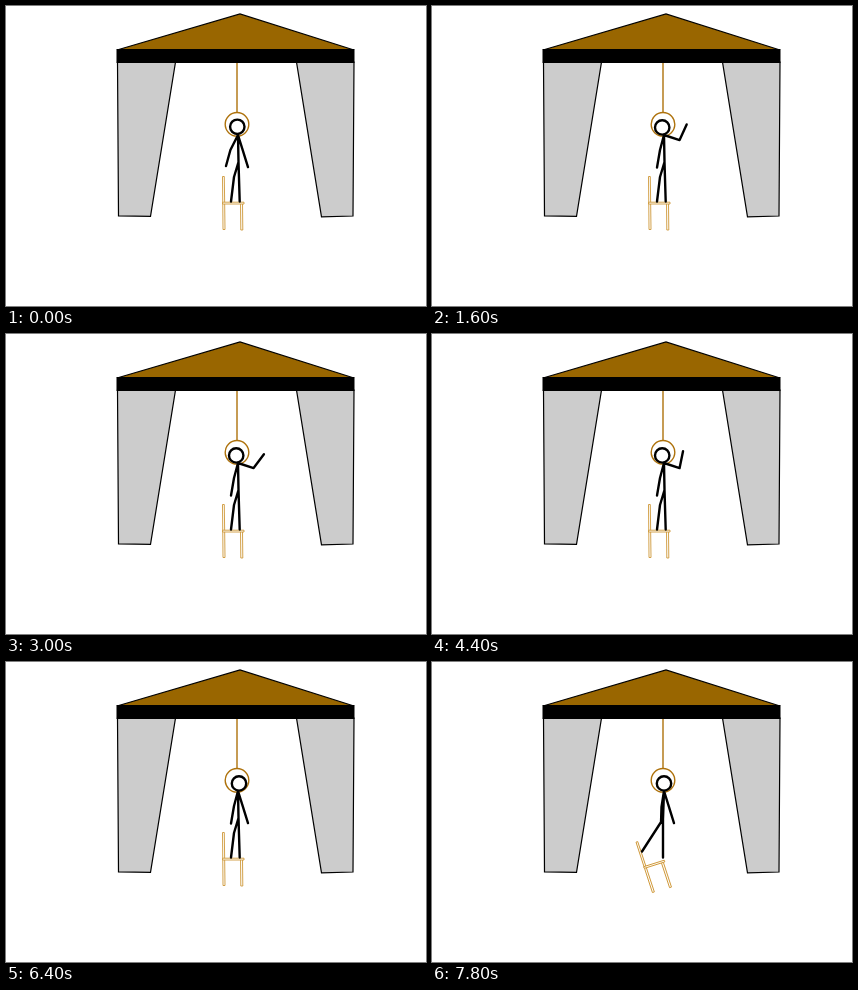
An HTML page for the animation above (8 s loop, 420 px wide and 300 px high).

```html
<!DOCTYPE html>
<html lang="en">
<head>
<meta charset="utf-8">
<title>Stick figure stage</title>
<style>
html, body { margin: 0; width: 100%; height: 100%; overflow: hidden; background: #fff; }
svg { display: block; width: 420px; height: 300px; }
.limb { fill: none; stroke: #000; stroke-width: 2.4; stroke-linecap: round; stroke-linejoin: round; }
.rope { fill: none; stroke: #ae720c; stroke-width: 1.4; }
.drape { fill: #ccc; stroke: #000; stroke-width: 1.2; }
</style>
</head>
<body>
<svg viewBox="0 0 420 300">
  <path d="M111 44L234 8L348 44Z" fill="#996600" stroke="#000" stroke-width="1.2"/>
  <path class="drape" d="M111.5 56H169.5L144.5 210.3L112.5 209.8Z"/>
  <path class="drape" d="M290.5 56H348L347 210L315.5 210.8Z"/>
  <rect x="110.5" y="43" width="238" height="14"/>
  <path class="rope" d="M231 57V106.5"/>
  <g id="chair" fill="#fff" stroke="#cf9838" stroke-width=".9">
    <path d="M-.5 0H1.3L2 53H0Z"/>
    <path d="M17.5 27H19.5L19.8 53.5H17.8Z"/>
    <path d="M-.5 25.7H21V27.5H-.5Z"/>
  </g>
  <circle class="rope" cx="231" cy="118.3" r="11.8"/>
  <circle id="head" r="7.2" fill="#fff" stroke="#000" stroke-width="2.4"/>
  <path id="body" class="limb"/>
</svg>
<script>
const LOOP = 8000, STEP = 200;
const NECK = [232, 129], UPPER = 16.4, FORE = 17.2;
const ARM_DOWN = 17.3, ARM_OUT = 72;
const WAVE_START = 1600, WAVE_END = 4400, WAVE_PERIOD = 2600 / 3;
const $ = id => document.getElementById(id);

const ramp = (t, from, to) => Math.min(1, Math.max(0, (t - from) / (to - from)));
const mix = (a, b, u) => a + (b - a) * u;
const blend = (p, q, u) => p.map((v, i) => mix(v, q[i], u));

// Angles run from straight down towards the right, in degrees.
function reach([x, y], length, angle) {
  const a = angle * Math.PI / 180;
  return [x + length * Math.sin(a), y + length * Math.cos(a)];
}

function wavingArm(t) {
  const lift = ramp(t, 600, WAVE_START);
  const waveTime = Math.min(WAVE_END, Math.max(WAVE_START, t));
  const wave = 154 + 14.5 * Math.cos(2 * Math.PI * (waveTime - WAVE_END) / WAVE_PERIOD);
  const elbow = reach(NECK, UPPER, mix(ARM_DOWN, ARM_OUT, lift - ramp(t, 5200, 5800)));
  const hand = reach(elbow, FORE, mix(ARM_DOWN, wave, lift - ramp(t, WAVE_END, 5800)));
  return [...NECK, ...elbow, ...hand];
}

function draw(time) {
  const t = Math.floor((time % LOOP) / STEP) * STEP;
  const turn = ramp(t, 0, 200), kick = ramp(t, 6800, 7800), fall = ramp(t, 7200, 7800);

  $('head').setAttribute('cx', 231.3 - 1.1 * turn + 2.8 * ramp(t, 5600, 6400) - ramp(t, 6800, 7200));
  $('head').setAttribute('cy', 120.8 + 0.6 * turn);
  $('chair').setAttribute('transform',
    `translate(${217 - 12.5 * fall} ${170.5 + 9.5 * fall}) rotate(${-17.5 * fall})`);

  const hip = blend([232.5, 156], [231, 157], kick);
  const rightFoot = blend([233.7, 195.5], [231, 195.5], kick);
  const leftLeg = blend([228, 171, 225, 195.5], [220, 174, 210, 189.5], kick);
  const relaxed = blend([224.4, 144, 220, 160], [228, 144, 225, 161.5], turn);
  const leftArm = blend(relaxed, [229.5, 145, 229, 161], kick);
  const lines = [
    [...NECK, ...hip, ...rightFoot],
    [...hip, ...leftLeg],
    [...NECK, ...leftArm],
    wavingArm(t)
  ];
  $('body').setAttribute('d', lines.map(l => 'M' + l.join(' ')).join(''));
}

const start = performance.now();
function tick() {
  draw(performance.now() - start);
  requestAnimationFrame(tick);
}
tick();
</script>
</body>
</html>
```
